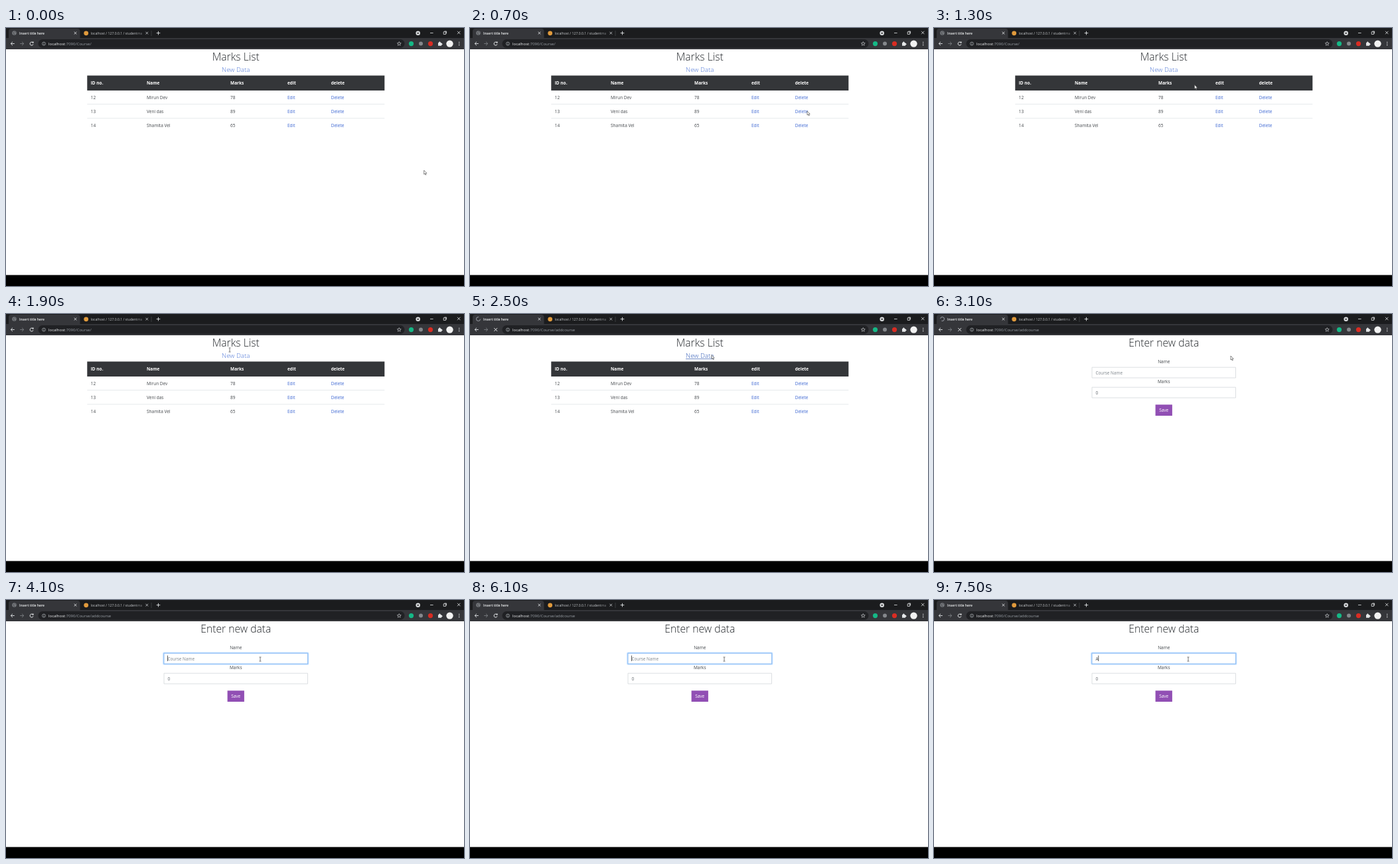
Animation of 690 by 388 pixels, one loop 8000 ms. Source, as an HTML page with a canvas:

```html
<!DOCTYPE html>
<html lang="en">
<head>
<meta charset="utf-8">
<title>Marks List</title>
<style>
  html, body { margin: 0; width: 100%; height: 100%; overflow: hidden; background: #fff; }
  canvas { display: block; }
</style>
</head>
<body>
<canvas id="stage" width="690" height="388"></canvas>
<script>
const ctx = document.getElementById('stage').getContext('2d');
const LOOP = 8000, STEP = 100;
const FONT = '"Open Sans", "Noto Sans", sans-serif';
const INK = '#44484c', LINK = '#3c66d2', ICON = '#e4e6e8';
const CLICK = 2400, PAGE = 3100, LOADED = 3200, FOCUS = 3900, TYPED = 6400;
const COLS = [127.7, 212, 338, 424, 489.7];
const HEAD = ['ID no.', 'Name', 'Marks', 'edit', 'delete'];
const ROWS = [
  ['12', 'Mirun Dev', '78', 'Edit', 'Delete'],
  ['13', 'Veni das', '89', 'Edit', 'Delete'],
  ['14', 'Shamita Vel', '65', 'Edit', 'Delete']
];

// Pointer stops: time, x, y
const PATH = [
  [0, 629.7, 214], [100, 624, 205], [200, 586, 172], [300, 505, 112], [400, 405, 55],
  [500, 357, 25], [600, 435, 82], [700, 508, 125], [800, 515, 140], [1000, 516, 143],
  [1200, 455, 105], [1400, 330, 66], [1600, 232, 41], [1700, 250, 42], [1800, 297, 44],
  [1900, 337, 54], [2000, 343, 60], [2100, 346, 61], [2400, 346, 61], [2700, 400, 63],
  [3000, 447, 63], [3200, 447, 63], [3400, 436, 58], [3600, 402, 96], [3800, 383, 89]
];

function pointerAt(t) {
  const i = PATH.findIndex(p => p[0] > t);
  if (i < 0) return PATH[PATH.length - 1].slice(1);
  const [t0, x0, y0] = PATH[i - 1], [t1, x1, y1] = PATH[i];
  const k = (t - t0) / (t1 - t0);
  return [x0 + (x1 - x0) * k, y0 + (y1 - y0) * k];
}

function text(str, x, y, size, color, weight = 400, align = 'left') {
  ctx.font = `${weight} ${size}px ${FONT}`;
  ctx.textAlign = align;
  ctx.fillStyle = color;
  ctx.fillText(str, x, y);
  return ctx.measureText(str).width;
}

function rect(x, y, w, h, color, r = 0) {
  ctx.fillStyle = color;
  ctx.beginPath();
  ctx.roundRect(x, y, w, h, r);
  ctx.fill();
}

function frame(x, y, w, h, color, lw = 1, r = 0) {
  ctx.strokeStyle = color;
  ctx.lineWidth = lw;
  ctx.beginPath();
  ctx.roundRect(x, y, w, h, r);
  ctx.stroke();
}

function dot(x, y, r, color) {
  ctx.fillStyle = color;
  ctx.beginPath();
  ctx.arc(x, y, r, 0, 7);
  ctx.fill();
}

function arc(x, y, r, a, b, color, lw = 1) {
  ctx.strokeStyle = color;
  ctx.lineWidth = lw;
  ctx.beginPath();
  ctx.arc(x, y, r, a, b);
  ctx.stroke();
}

function trace(pts) {
  ctx.beginPath();
  for (let i = 0; i < pts.length; i += 2) ctx.lineTo(pts[i], pts[i + 1]);
}

function line(pts, color, lw = 1) {
  trace(pts);
  ctx.strokeStyle = color;
  ctx.lineWidth = lw;
  ctx.stroke();
}

function cross(x, y, r, color, lw = 1) {
  line([x - r, y - r, x + r, y + r], color, lw);
  line([x - r, y + r, x + r, y - r], color, lw);
}

function tabs(t, loading) {
  rect(0, 0, 690, 16, '#1b1c1e');
  rect(4, 1, 107.5, 18, '#35363a', 4);
  if (loading) {
    const a = -t / 1000 * 5;
    arc(12.5, 7.5, 3, a, a + 4.9, '#a9adb5', 0.9);
  } else {
    dot(12.5, 7.5, 3.3, '#74777b');
    line([10.4, 6, 12, 7.2, 11.6, 9, 13.2, 10], '#44464a', 0.8);
    line([12.8, 5, 14.6, 6.8], '#44464a', 0.8);
  }
  text('Insert title here', 20, 9.5, 5.1, '#f1f3f4', 600);
  cross(104.5, 7.6, 1.8, '#e8eaed', 0.9);
  dot(120.7, 7.8, 3.4, '#e09a3c');
  const fade = ctx.createLinearGradient(194, 0, 207, 0);
  fade.addColorStop(0, '#c5c8cb');
  fade.addColorStop(1, '#55585c');
  text('localhost / 127.0.0.1 / studentma', 127.7, 9.5, 5.1, fade);
  cross(212.3, 7.6, 1.8, '#c5c8cb', 0.9);
  line([219, 4, 219, 12], '#4a4c50', 0.7);
  line([226.7, 7.6, 232.3, 7.6], ICON, 0.9);
  line([229.5, 4.8, 229.5, 10.4], ICON, 0.9);
  dot(620.7, 7.8, 3.3, '#d6d8da');
  trace([619, 7, 622.4, 7, 620.7, 9.2]);
  ctx.fillStyle = '#222';
  ctx.fill();
  line([639, 7.5, 643.6, 7.5], ICON, 0.8);
  frame(659.2, 5.8, 3.4, 3.6, ICON, 0.8);
  line([660.4, 5, 663.6, 5, 663.6, 8.4], ICON, 0.8);
  cross(682.2, 7, 2.2, ICON, 0.8);
}

function arrow(x, dir, color) {
  line([x - 2.8, 23.5, x + 2.8, 23.5], color, 0.9);
  line([x, 20.8, x + 2.8 * dir, 23.5, x, 26.2], color, 0.9);
}

function star(x, y, r) {
  const pts = [];
  for (let i = 0; i <= 10; i++) {
    const a = i * Math.PI / 5 - Math.PI / 2, k = i % 2 ? r * 0.45 : r;
    pts.push(x + k * Math.cos(a), y + k * Math.sin(a));
  }
  line(pts, '#c8cacd', 0.7);
}

function toolbar(loading, path) {
  rect(0, 15, 690, 17, '#35363a');
  arrow(10, -1, ICON);
  arrow(24, 1, '#7c7f83');
  if (loading) {
    cross(38.7, 23.5, 2.4, ICON, 1);
  } else {
    arc(38.6, 23.6, 2.5, 0.3, 5.5, ICON, 1);
    rect(39.6, 20.6, 2, 2, ICON);
  }
  rect(48.5, 17, 552, 13, '#202124', 6.5);
  arc(57, 23.6, 2.5, 0, 7, '#b4b8bc', 0.7);
  line([57, 23.2, 57, 25.2], '#b4b8bc', 0.7);
  line([57, 21.9, 57, 22.6], '#b4b8bc', 0.7);
  const w = text('localhost', 64, 25.7, 6, '#f1f3f4');
  text(path, 64 + w, 25.7, 6, '#9aa0a6');
  star(592.3, 23.7, 3.1);
  dot(610.5, 23.6, 3.6, '#15b886');
  dot(625, 23.6, 3, '#85888c');
  dot(639.5, 23.6, 3.6, '#d92c23');
  rect(651, 22, 5, 4.8, ICON, 0.5);
  dot(653.3, 21.6, 1.2, ICON);
  dot(656.2, 24.3, 1.2, ICON);
  dot(668.5, 23.6, 5.2, '#f2f2f2');
  for (const y of [21.4, 23.6, 25.8]) dot(682.7, y, 0.7, ICON);
}

function listPage(hover) {
  text('Marks List', 346.3, 49, 15.7, '#22262a', 300, 'center');
  const w = text('New Data', 346.3, 66, 9.8, hover ? '#2a56b4' : '#4a74d6', 300, 'center');
  if (hover) rect(346.3 - w / 2, 67, w, 0.8, '#4a6cb8');
  rect(122.3, 71.5, 448, 22.5, '#343639');
  HEAD.forEach((s, i) => text(s, COLS[i], 84.8, 6.5, '#fff', 700));
  ROWS.forEach((row, r) => {
    const y = 106.8 + r * 21.3;
    row.forEach((s, i) => text(s, COLS[i], y, 6.5, i > 2 ? LINK : INK));
    if (r < 2) rect(122.3, y + 7.4, 448, 0.7, '#dee2e6');
  });
}

function field(y, focus) {
  if (focus) frame(237.2, y - 0.7, 218.1, 17.4, `rgba(0,123,255,${0.28 * focus})`, 1.8, 1);
  frame(238, y + 0.2, 216.5, 15.8, focus ? '#80b4f0' : '#d3d7db', 0.8);
}

function formPage(t) {
  const focus = Math.max(0, Math.min(1, (t - FOCUS + 100) / 200));
  const typed = t >= TYPED;
  text('Enter new data', 346.3, 49, 15.7, '#22262a', 300, 'center');
  text('Name', 346.3, 73.6, 6.5, INK, 400, 'center');
  field(80, focus);
  if (typed) text('A', 243.4, 90.6, 6.5, '#495057');
  else text('Course Name', 243.4, 90.6, 6.4, '#7d848b');
  if (caretOn(t)) rect(typed ? 247.4 : 243, 83.5, 0.8, 8.6, '#333');
  text('Marks', 346.3, 103.8, 6.5, INK, 400, 'center');
  field(110, 0);
  text('0', 243.4, 120.7, 6.5, '#5a6067');
  rect(333.6, 136.3, 25.3, 16.7, '#914fb4');
  text('Save', 346.2, 147.1, 6.5, '#fff', 400, 'center');
}

function caretOn(t) {
  const flips = [FOCUS, 4500, 5000, 5500, 6100, 6900, 7500];
  return flips.filter(f => t >= f).length % 2 === 1;
}

function shape(pts, x, y) {
  trace(pts.map((v, i) => v + (i % 2 ? y : x)));
  ctx.closePath();
  ctx.fillStyle = '#fff';
  ctx.fill();
  ctx.strokeStyle = '#555';
  ctx.lineWidth = 0.7;
  ctx.stroke();
}

function pointer(t) {
  const [x, y] = pointerAt(t);
  const beam = (t >= 1900 && t < 2000) || t >= 3700;
  const hand = t >= 2000 && t <= CLICK;
  if (beam) {
    line([x, y - 3, x, y + 3], '#555', 0.8);
    line([x - 1.5, y - 3.1, x + 1.5, y - 3.1], '#555', 0.7);
    line([x - 1.5, y + 3.1, x + 1.5, y + 3.1], '#555', 0.7);
  } else if (hand) {
    shape([-0.6, 0, 0.6, 0, 0.8, 2.4, 3.4, 3.2, 3, 7, -0.6, 7, -2.4, 4.2, -0.7, 4.6], x, y);
  } else {
    shape([0, 0, 0, 6, 1.4, 4.8, 2.4, 7, 3.3, 6.6, 2.4, 4.4, 4.2, 4.3], x, y);
  }
}

function draw(t) {
  const loading = t >= CLICK && t < LOADED;
  rect(0, 0, 690, 388, '#fff');
  tabs(t, loading);
  toolbar(loading, t < CLICK ? ':7090/Course/' : ':7090/Course/addcourse');
  if (t < PAGE) listPage(t >= 2000);
  else formPage(t);
  rect(0, 371.5, 690, 16.5, '#000');
  pointer(t);
}

const start = performance.now();
function tick() {
  const t = (performance.now() - start) % LOOP;
  draw(Math.floor(t / STEP) * STEP);
  requestAnimationFrame(tick);
}
tick();
</script>
</body>
</html>
```
